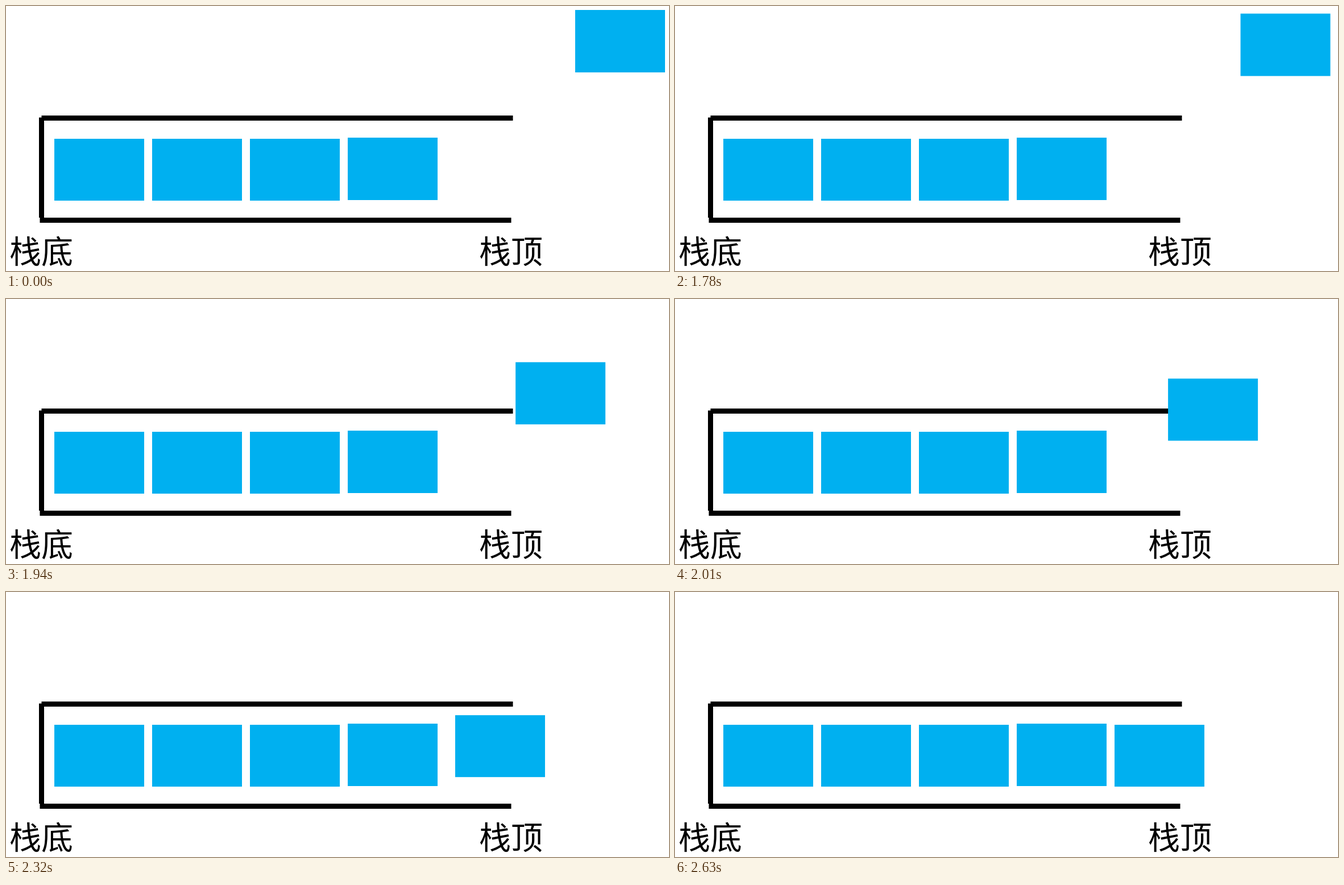
An HTML page that plays this animation: 1166 px wide and 467 px high, repeating every 3.09 s.

```html
<!DOCTYPE html>
<html lang="zh-CN">
<head>
<meta charset="utf-8">
<style>
  html, body { margin: 0; width: 100%; height: 100%; overflow: hidden; background: #fff; }
  svg { display: block; }
  text { font: 300 56px "Noto Sans CJK SC", "Noto Sans CJK", sans-serif; }
  .block { fill: #00b0f0; }
</style>
</head>
<body>
<svg width="1166" height="467" viewBox="0 0 1166 467">
  <path d="M62.5 193H891.5V202H62.5ZM58 196.5H67V373H58ZM59.5 373H888.5V382H59.5Z"/>
  <text x="6" y="453">栈底</text>
  <text x="832" y="453">栈顶</text>
  <g class="block">
    <rect x="85" y="234" width="158" height="109"/>
    <rect x="257" y="234" width="158" height="109"/>
    <rect x="429" y="234" width="158" height="109"/>
    <rect x="601" y="232" width="158" height="110"/>
    <rect id="pushed" x="1001" y="7" width="158" height="110"/>
  </g>
</svg>
<script>
const LOOP = 3090;
const STEPS = [1710, 1790, 1860, 1940, 2010, 2090, 2170, 2240, 2320, 2400, 2480, 2550];
const START = 0.25, ACCEL = 1.7, DECEL = 10; // in steps
const pushed = document.getElementById('pushed');

// Constant acceleration followed by constant deceleration
function progress(step) {
  const total = ACCEL + DECEL;
  const s = Math.min(Math.max(step - START, 0), total);
  return s < ACCEL
    ? s * s / (ACCEL * total)
    : 1 - (total - s) ** 2 / (DECEL * total);
}

function draw(now) {
  const t = now % LOOP;
  const p = progress(STEPS.filter(time => time <= t).length);
  const lerp = (from, to) => from + (to - from) * p;
  pushed.setAttribute('x', lerp(1001, 773));
  pushed.setAttribute('y', lerp(7, 234));
  pushed.setAttribute('height', lerp(110, 109));
  requestAnimationFrame(draw);
}
draw(performance.now());
</script>
</body>
</html>
```
